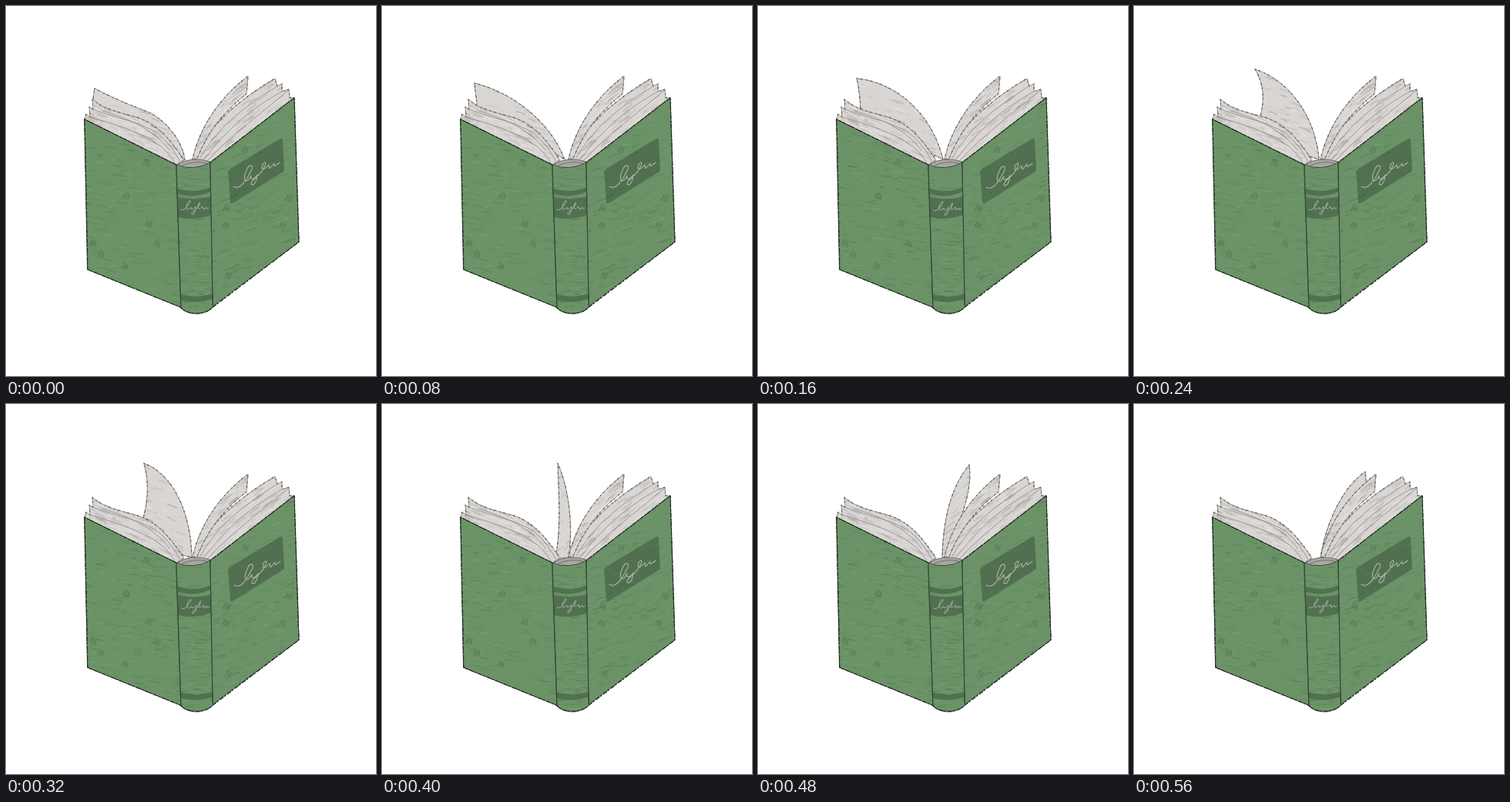
These frames come from a looping animation (480 px wide and 480 px high, 0.64 s). An HTML page with a canvas:

```html
<!DOCTYPE html>
<html lang="en">
<head>
<meta charset="utf-8">
<title>Book turning its pages</title>
<style>
  html, body { margin: 0; width: 100%; height: 100%; overflow: hidden; background: #fff; }
  canvas { display: block; width: 480px; height: 480px; }
</style>
</head>
<body>
<canvas id="stage" width="480" height="480"></canvas>
<script>
const ctx = document.getElementById('stage').getContext('2d');
const STEP = 80, STEPS = 8;
const GREEN = '#6b9367', BAND = '#50704f', INK = '#354637', EDGE = '#1d291f';
const PAPER = '#d9d5d2', PENCIL = '#8b8885', CHALK = '#a9b5a6';

const leftCover = 'M102 147L221 206L227 391L106 342Z';
const rightCover = 'M265 203L374 119L380 306L269 389Z';
const spine = 'M221 206Q243 215 265 203L268 391C259 401 236 402 227 392Z';
const label = 'M291 211L356 172Q359 171 359 174L361 214L294 256Q291 257 291 253L288 214Z';
const spineBands = [
  'M223 237Q246 244 265 235V241Q246 250 223 244Z',
  'M222 248Q246 253 266 247V271Q246 279 223 274Z',
  'M227 374Q249 380 268 373V380Q249 387 227 382Z'
];
const leftStack = 'M102 147L104 140L109 144L108 131L113 134L112 121' +
  'C128 135 148 138 168 144C196 152 213 173 231 200L221 206Z';
const leftLines = [
  'M113 134C145 147 178 150 200 168Q215 181 226 202',
  'M109 144C140 153 174 164 195 178Q212 190 219 204',
  'M125 136C158 146 190 158 212 187'
];
const rightStack = 'M243 200C252 174 282 133 349 94L352 104L358 101L358 111L367 108L368 119L374 119L265 203Z';
const rightPage = 'M242 199C250 160 276 119 314 91L312 114C284 136 262 162 248 198Z';
const rightLines = [
  'M352 104C318 125 276 154 252 197',
  'M358 111C320 131 285 162 257 199',
  'M367 109C336 135 290 169 261 201'
];
// One pose of the turning page per step, from the left stack to the right.
const turningPage = [
  'M115 107C148 124 168 131 188 139C211 152 230 178 232 200L200 175L119 132L113 122Z',
  'M120 100C164 111 216 145 237 199L205 180L124 132Z',
  'M128 94C175 98 225 136 240 199L210 185L133 135Q132 110 128 94Z',
  'M157 82C200 96 235 141 240 199L210 190L163 146Q174 110 157 82Z',
  'M179 77C216 90 240 140 241 199L215 193L177 152Q189 112 179 77Z',
  'M228 77C241 105 249 156 242 199L225 201C233 156 229 116 228 77Z',
  'M274 79C250 108 240 150 239 199L246 197C260 153 279 117 274 79Z',
  'M300 88C272 106 249 153 242 199L248 197C265 155 283 125 301 102Z'
];
const titleScript = 'M295 234C305 240 312 224 319 212C321 205 315 205 312 213C308 222 308 229 314 226' +
  'L318 220C316 227 322 225 326 219C325 229 321 234 318 231C317 226 329 221 334 211' +
  'C339 203 336 200 333 206C330 214 335 213 341 206L342 211L348 204C346 210 350 207 355 203';
const spineScript = 'M227 264C231 267 236 259 239 254C239 250 235 255 234 260C233 266 237 264 240 261' +
  'C239 265 243 264 246 260C246 268 243 272 241 270C241 266 248 264 251 258' +
  'C253 253 250 254 249 259C248 265 252 263 255 260L256 264L260 261Q259 265 263 262';

function randomFrom(seed) {
  return () => (seed = (seed * 16807) % 2147483647) / 2147483647;
}

function fill(d, color) {
  ctx.fillStyle = color;
  ctx.fill(new Path2D(d));
}

function line(d, color, width = 1) {
  ctx.strokeStyle = color;
  ctx.lineWidth = width;
  ctx.stroke(new Path2D(d));
}

function roughLine(d, color, dash) {
  ctx.setLineDash(dash);
  line(d, color, 1.2);
  ctx.setLineDash([]);
}

// Short pencil strokes inside a shape; box is x, y, width, height.
function shade(d, box, count, slope, colors, seed, width = 1) {
  const random = randomFrom(seed), [x0, y0, w, h] = box;
  ctx.save();
  ctx.clip(new Path2D(d));
  for (let i = 0; i < count; i++) {
    const x = x0 + random() * w, y = y0 + random() * h;
    const length = 3 + random() * 11;
    const rise = length * (slope + (random() - .5) * .2);
    ctx.globalAlpha = .12 + random() * .3;
    line(`M${x} ${y}q${length / 2} ${rise / 2 - .8} ${length} ${rise}`,
      colors[i % colors.length], width * (.6 + random() * .9));
  }
  ctx.restore();
}

function hatch(x, y) {
  ctx.globalAlpha = .6;
  for (let i = 0; i < 3; i++) line(`M${x + i * 3} ${y + i}l${3 - i * .5} -7`, '#456747', 1.1);
  ctx.globalAlpha = 1;
}

function paper(d, box, slope, seed) {
  fill(d, PAPER);
  shade(d, box, 260, slope, ['#979390', '#aaa6a3', '#eeeae7'], seed, 1.7);
  line(d, PENCIL, .9);
  roughLine(d, '#5f5d5b', [1, 4, 2, 6]);
}

function draw(step) {
  const steady = step === 0 || step % 2 === 1;
  const seed = steady ? 731 : 9241;
  const greens = ['#476c49', '#547c55', '#47694a', '#86a783'];

  ctx.fillStyle = '#fff';
  ctx.fillRect(0, 0, 480, 480);
  ctx.lineCap = ctx.lineJoin = 'round';

  paper(turningPage[step], [110, 76, 195, 125], step < 5 ? .35 : -.8, seed + 7);
  paper(leftStack, [102, 120, 130, 87], .45, seed + 11);
  leftLines.forEach(d => line(d, PENCIL, .8));
  paper(rightStack, [242, 92, 132, 110], -.7, seed + 17);
  rightLines.forEach(d => line(d, PENCIL, .8));
  paper(rightPage, [242, 90, 74, 110], -.8, seed + 23);

  fill('M222 206Q240 194 265 202Q245 215 222 206Z', '#aaa7a3');
  line('M222 206Q240 194 265 202M229 207Q243 200 260 204', '#716f6c');

  fill(leftCover, GREEN);
  shade(leftCover, [92, 146, 136, 246], 480, .18, greens, seed);
  fill(rightCover, GREEN);
  shade(rightCover, [256, 118, 126, 274], 480, -.32, greens, seed + 31);
  fill(spine, GREEN);
  shade(spine, [213, 204, 56, 196], 260, .02, greens, seed + 47);

  [[152, 249], [181, 285], [109, 310], [119, 325], [150, 340], [192, 311], [178, 205],
   [282, 265], [355, 287], [281, 287], [363, 252], [284, 353], [306, 189]]
    .forEach(([x, y]) => hatch(x, y));

  spineBands.forEach(d => fill(d, BAND));
  fill(label, BAND);
  shade(label, [286, 170, 76, 88], 45, -.4, ['#3e5f40', '#658663'], seed + 59);

  [leftCover, rightCover, spine].forEach(d => line(d, INK));
  roughLine('M221 206L102 147L106 342L227 391C236 402 259 401 268 391L380 306L374 119L265 203',
    EDGE, [5, 2, 2, 3]);

  // The lettering wobbles with the pencil texture.
  ctx.save();
  if (!steady) ctx.translate(1, 1);
  line(titleScript, CHALK, 1.1);
  line(spineScript, CHALK);
  ctx.restore();
}

let shown = -1;
function tick() {
  const step = Math.floor(performance.now() / STEP) % STEPS;
  if (step !== shown) draw(shown = step);
  requestAnimationFrame(tick);
}
tick();
</script>
</body>
</html>
```
